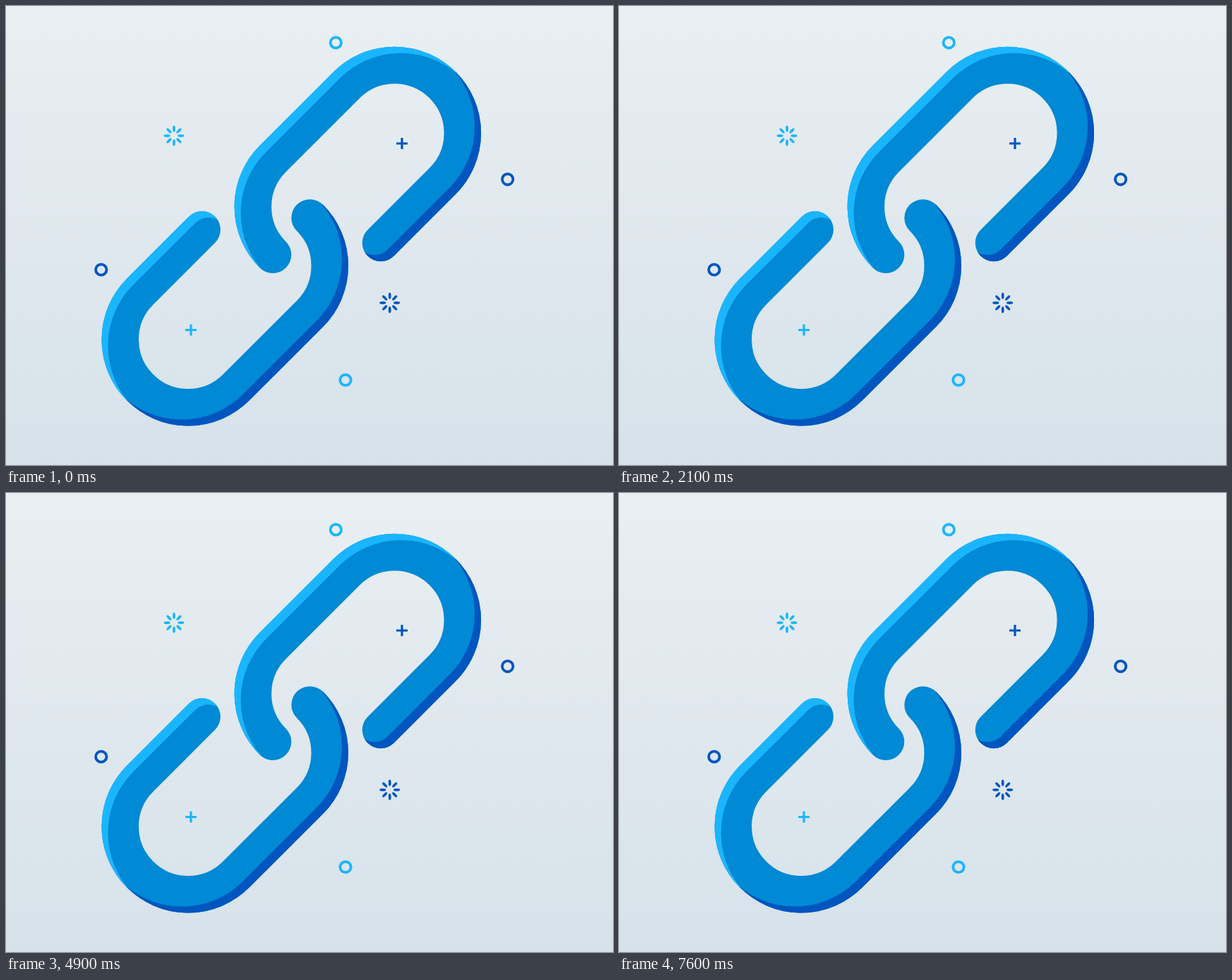
These frames come from a looping animation (860 by 651 pixels, 8.2 s). An HTML page:

```html
<!DOCTYPE html>
<html lang="en">
<head>
<meta charset="utf-8">
<title>Chain link</title>
<style>
  html, body { margin: 0; width: 100%; height: 100%; overflow: hidden; }
  svg { display: block; width: 100%; height: 100%; }
</style>
</head>
<body>
<svg id="stage" viewBox="0 0 860 651"></svg>
<script>
const LIGHT = '#1ab5ff', BLUE = '#0089d5', DARK = '#0055bf';
const LOOP = 8200, STEP = 100, CYCLES = 3, LEAD = 800;
const DRAWN = 800, FULL = 880, POP = [1100, 1833];

// Link geometry: x runs along the link's axis, y across it.
const R = 96.25, BEVEL = 12.7;
const RING = `M124,${-R}H0A${R},${R} 0 0 0 0,${R}H147.8A${R},${R} 0 0 0 244.05,0`;

const links = [
  {
    turn: 0, upper: LIGHT, lower: DARK,
    wipe: 'M200,-100H0A97.5,97.5 0 0 0 0,95H147.8A96,96 0 0 0 244,0',
    keys: [[0, 15], [800, 814]]
  },
  {
    turn: 180, upper: DARK, lower: LIGHT,
    wipe: 'M200,-101H0A90.5,90.5 0 0 0 0,80H147.8A90,90 0 0 0 231.3,45',
    keys: [[0, 2], [66.7, 52], [500, 438.5], [800, 727]]
  }
];

const ring = (color, extra = '') =>
  `<path d="${RING}" fill="none" stroke="${color}" stroke-width="52.5" stroke-linecap="round" ${extra}/>`;

const mask = (id, body) =>
  `<mask id="${id}" maskUnits="userSpaceOnUse" x="-200" y="-200" width="600" height="400">${body}</mask>`;

// Keeps the crescent of one half that the shifted ring leaves uncovered.
const bevelMask = (id, x, y, w, shift) => mask(id,
  `<rect x="${x}" y="${y}" width="${w}" height="150" fill="#fff"/>` +
  ring('#000', `transform="translate(0 ${shift})"`));

const linkMarkup = (link, i) => `
  <g transform="rotate(${link.turn} 404.3 326.6) translate(258 473) rotate(-45)">
    ${bevelMask('upper' + i, -150, -150, 350, BEVEL)}
    ${bevelMask('lower' + i, -150, 0, 450, -BEVEL)}
    ${mask('wipe' + i, `<path id="front${i}" d="${link.wipe}" fill="none" stroke="#fff" stroke-width="96" stroke-linecap="round"/>`)}
    <g id="link${i}">
      ${ring(BLUE)}
      ${ring(link.upper, `mask="url(#upper${i})"`)}
      ${ring(link.lower, `mask="url(#lower${i})"`)}
    </g>
  </g>`;

const shapes = {
  dot: c => `<circle r="7.7" fill="none" stroke="${c}" stroke-width="3.8"/>`,
  plus: c => `<path d="M-8,0H8M0,-8V8" stroke="${c}" stroke-width="3.2"/>`,
  burst: c => Array.from({ length: 8 }, (_, k) =>
    `<ellipse cx="9.9" rx="4.6" ry="1.9" fill="${c}" transform="rotate(${k * 45})"/>`).join('')
};

const ornaments = [
  ['dot', 467.3, 52, LIGHT], ['dot', 710.7, 245.8, DARK],
  ['dot', 134.8, 374, DARK], ['dot', 481, 530.5, LIGHT],
  ['plus', 561, 195, DARK], ['plus', 262, 459.5, LIGHT],
  ['burst', 238, 184, LIGHT], ['burst', 543.7, 421, DARK]
];

const stage = document.getElementById('stage');
stage.innerHTML = `
  <linearGradient id="sky" x2="0" y2="1">
    <stop offset="0" stop-color="#e9eff2"/>
    <stop offset=".5" stop-color="#e0e8ee"/>
    <stop offset="1" stop-color="#d6e2ea"/>
  </linearGradient>
  <rect width="860" height="651" fill="url(#sky)"/>
  ${links.map(linkMarkup).join('')}
  ${ornaments.map(([kind, , , color]) => `<g class="ornament">${shapes[kind](color)}</g>`).join('')}`;

const byId = id => document.getElementById(id);
const pops = [...stage.querySelectorAll('.ornament')];
const show = (el, on) => el.setAttribute('visibility', on ? 'visible' : 'hidden');
const clamp = u => Math.min(1, Math.max(0, u));

function along(keys, t) {
  let i = 1;
  while (i < keys.length - 1 && t > keys[i][0]) i++;
  const [t0, a] = keys[i - 1], [t1, b] = keys[i];
  return a + (b - a) * clamp((t - t0) / (t1 - t0));
}

function render(now) {
  const t = Math.floor((now % LOOP) / STEP) * STEP;
  const local = ((t * CYCLES - LEAD + LOOP) % LOOP) / CYCLES;

  links.forEach((link, i) => {
    const body = byId('link' + i);
    show(body, local > 0);
    if (local < FULL) body.setAttribute('mask', `url(#wipe${i})`);
    else body.removeAttribute('mask');
    const reach = along(link.keys, Math.min(local, DRAWN));
    byId('front' + i).setAttribute('stroke-dasharray', `${reach} 2000`);
  });

  const u = clamp((local - POP[0]) / (POP[1] - POP[0]));
  const size = 1 - (1 - u) ** 2;
  pops.forEach((el, i) => {
    const [, x, y] = ornaments[i];
    show(el, u > 0);
    el.setAttribute('transform', `translate(${x} ${y}) scale(${size})`);
  });
}

function tick() {
  render(performance.now());
  requestAnimationFrame(tick);
}
tick();
</script>
</body>
</html>
```
